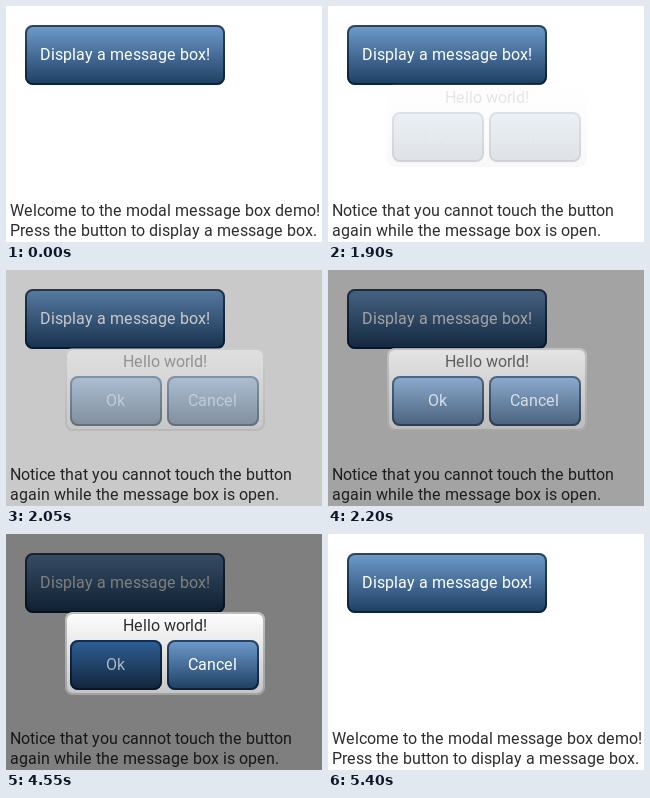
An HTML page with a canvas for the animation above (6550 ms loop, 316 by 236 pixels).

```html
<!DOCTYPE html>
<html lang="en">
<head>
<meta charset="utf-8">
<title>Modal message box</title>
<style>
  html, body { margin: 0; width: 100%; height: 100%; overflow: hidden; background: #fff; }
  canvas { display: block; }
</style>
</head>
<body>
<canvas id="stage" width="316" height="236"></canvas>
<script>
const ctx = document.getElementById('stage').getContext('2d');
const LOOP = 6550, TICK = 50;
const PRESS = 1550, OPEN = 1850, OK_PRESS = 4550, CLOSE = 5200, CLOSED = 5400;
const MIN_ALPHA = 0.063; // fainter paint is skipped
const BOX = { x: 59, y: 78, w: 200, h: 83 };
const INK = '#2e2e2e';
const WELCOME = ['Welcome to the modal message box demo!',
                 'Press the button to display a message box.'];
const NOTICE = ['Notice that you cannot touch the button',
                'again while the message box is open.'];

const font = size => `${size}px Roboto, sans-serif`;
const advances = {};

// Glyph advance in whole pixels, rounded from sixteenths
function advance(ch) {
  if (!(ch in advances)) {
    ctx.font = font(256);
    advances[ch] = Math.floor((Math.round(ctx.measureText(ch).width) + 8) / 16);
  }
  return advances[ch];
}

function label(text, x, y, color) {
  const steps = [...text].map(advance);
  ctx.font = font(16);
  ctx.fillStyle = color;
  steps.forEach((step, i) => {
    ctx.fillText(text[i], x, y);
    x += step;
  });
}

function centered(text, cx, y, color) {
  const width = [...text].reduce((sum, ch) => sum + advance(ch), 0);
  label(text, Math.floor(cx - width / 2), y, color);
}

// Rounded panel with a vertical gradient and a translucent 2px inner border
function panel(x, y, w, h, top, bottom, border, borderAlpha) {
  const fill = ctx.createLinearGradient(0, y, 0, y + h);
  fill.addColorStop(0, top);
  fill.addColorStop(1, bottom);
  ctx.fillStyle = fill;
  ctx.beginPath();
  ctx.roundRect(x, y, w, h, Math.min(8, w / 2, h / 2));
  ctx.fill();
  if (w <= 2 || h <= 2 || ctx.globalAlpha * borderAlpha < MIN_ALPHA) return;
  ctx.strokeStyle = `rgba(${border},${borderAlpha})`;
  ctx.lineWidth = 2;
  ctx.beginPath();
  ctx.roundRect(x + 1, y + 1, w - 2, h - 2, Math.min(7, w / 2 - 1, h / 2 - 1));
  ctx.stroke();
}

function button(text, x, y, w, h, pressed) {
  const [top, bottom, color] = pressed
    ? ['#2f6096', '#12243a', '#a9b7c9']
    : ['#6f9ccd', '#1d3e62', '#fff'];
  panel(x, y, w, h, top, bottom, '0,12,30', 0.6);
  centered(text, x + w / 2, y + h / 2 + 5, color);
}

function messageBox(alpha, scale, okPressed) {
  const { x, y } = BOX, w = BOX.w * scale, h = BOX.h * scale;
  const bw = Math.max(0, (w - 16) / 2);
  ctx.save();
  ctx.globalAlpha = alpha;
  ctx.beginPath();
  ctx.rect(x, y, w, h);
  ctx.clip();
  panel(x, y, w, h, '#fff', '#c4c4c4', '128,128,128', 0.5);
  centered(w < 95 ? 'Hello' : 'Hello world!', x + w / 2, y + 19, INK);
  button('Ok', x + 5, y + 28, bw, 50, okPressed);
  button('Cancel', x + 10 + bw, y + 28, bw, 50, false);
  ctx.restore();
}

function draw(now) {
  const t = Math.floor(now % LOOP / TICK) * TICK;
  const open = t >= OPEN && t < CLOSED;
  ctx.fillStyle = '#fff';
  ctx.fillRect(0, 0, 316, 236);
  button('Display a message box!', 19, 19, 200, 60, t >= PRESS && t < OPEN);
  (open ? NOTICE : WELCOME).forEach((line, i) => label(line, 4, 210 + 20 * i, INK));

  if (open) {
    const fade = Math.min(1, (t - OPEN + 10) / 500);
    const shrink = Math.max(0, (t - CLOSE) / (CLOSED - CLOSE));
    if (fade / 2 >= MIN_ALPHA) {
      ctx.fillStyle = `rgba(0,0,0,${fade / 2})`;
      ctx.fillRect(0, 0, 316, 236);
    }
    if (fade >= MIN_ALPHA) messageBox(fade, 1 - shrink, t >= OK_PRESS && t < CLOSE);
  }
}

const start = performance.now();
function frame() {
  draw(performance.now() - start);
  requestAnimationFrame(frame);
}
frame();
</script>
</body>
</html>
```
